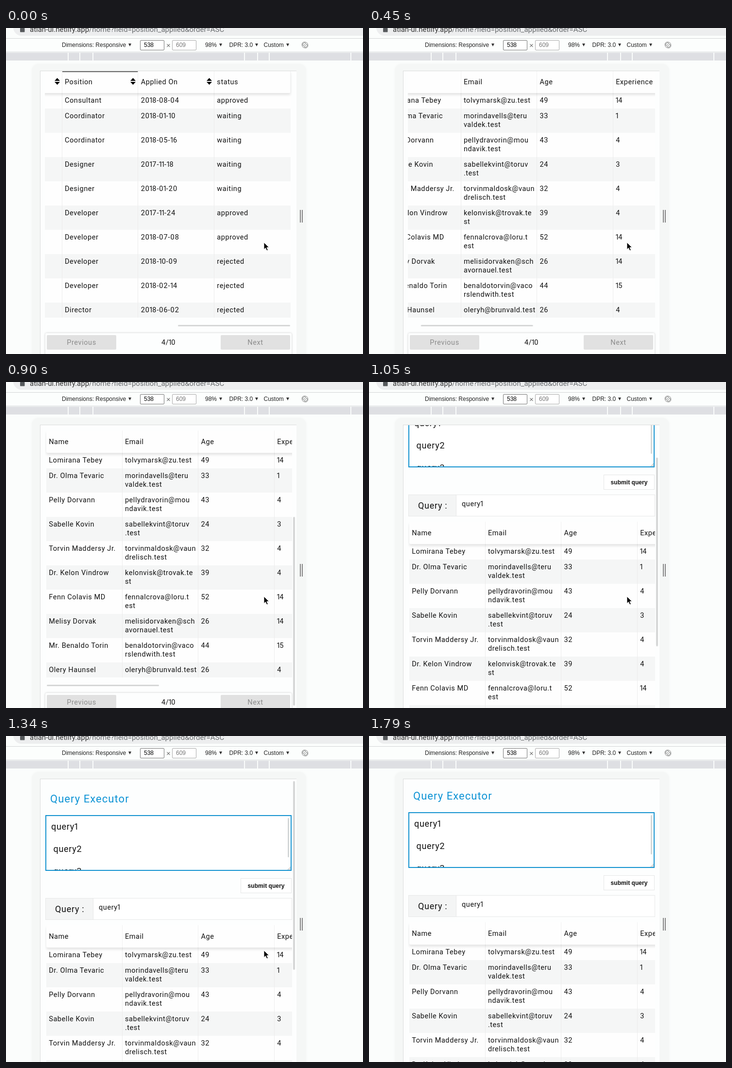
An HTML page for the animation above (2.69 s loop, 735 by 672 pixels).

```html
<!DOCTYPE html>
<html lang="en">
<head>
<meta charset="utf-8">
<title>Query table</title>
<style>
  html, body { margin: 0; width: 100%; height: 100%; overflow: hidden; }
  body { position: relative; background: #fbfdfc; color: #111; font: 14.5px/18px Roboto, sans-serif; letter-spacing: .58px; }
  body div, body svg { position: absolute; box-sizing: border-box; white-space: nowrap; }
  i { font-style: normal; margin: 0 -2.6px 0 -1.2px; }

  /* browser chrome */
  #address { left: 15px; top: -20px; width: 760px; height: 36px; border-radius: 17px; background: #edeeef; }
  #url { left: 49px; top: -6px; font-size: 15px; letter-spacing: 0; color: #333; }
  #url span { color: #696c6f; }
  #toolbar { left: 0; top: 21px; width: 735px; height: 29px; background: #fcfefd; border: solid #d3d5d7; border-width: 1px 0; }
  #ruler { left: 0; top: 51px; width: 735px; height: 16px; background: #dedfe3; }
  #ruler div { top: 0; width: 2px; height: 16px; background: #fbfdfc; }
  .tool { top: 26px; font: 12px/18px "Liberation Sans", Arial, sans-serif; letter-spacing: 0; color: #222; }
  .caret::after { content: ""; display: inline-block; margin: 0 0 1px 5px; border: solid transparent; border-width: 6px 3.5px 0; border-top-color: #333; }
  .size { top: 25px; width: 50px; height: 21px; padding-left: 7px; line-height: 19px; border: 1px solid #777; border-radius: 2px; background: #fff; }

  /* device */
  #device { left: 53px; top: 74px; width: 565px; height: 640px; border-radius: 14px; background: #f5f7f6; box-shadow: 0 0 5px #f5f7f6; }
  #card { left: 70px; top: 88px; width: 528px; height: 620px; background: #fdfefe; border: solid #dcdddd; border-width: 1px 0 0 1px; }
  .grip { top: 375px; width: 1.5px; height: 26px; background: #858585; }
  #view { inset: 0; clip-path: inset(89px 137px 0 71px); }
  #page { left: 0; top: 0; width: 735px; height: 672px; animation: scrollY 2690ms step-end infinite; }

  /* query form */
  #title { left: 91px; top: -185px; font-size: 22px; line-height: 26px; letter-spacing: 1.05px; color: #0d93d5; }
  #editor { left: 81px; top: -139px; width: 507px; height: 115px; border: 2px solid #1593d0; background: #fff; overflow: hidden; }
  #editor div, #label { font-size: 18px; letter-spacing: .7px; }
  #editor div { line-height: 46px; }
  #submit { left: 483px; top: -9px; width: 105px; height: 31px; border: 1px solid #e5e6e6; background: #fff; text-align: center; font: bold 12.1px/30px "Liberation Sans", Arial, sans-serif; letter-spacing: 0; }
  #query { left: 81px; top: 32px; width: 508px; height: 45px; border: 1px solid #e7e8e8; background: #fff; }
  #label { left: 0; top: 0; width: 98px; height: 43px; line-height: 44px; padding-left: 19px; background: #f4f5f5; border-right: 1px solid #e7e8e8; }

  /* table */
  #scroller { left: 80px; top: 88px; width: 509px; height: 509px; overflow: hidden; }
  #table { left: 3px; top: 0; width: 1097px; animation: scrollX 2690ms step-end infinite; }
  #table .row { position: relative; display: grid; grid-template-columns: repeat(7, 156.7px); background: #fefefe; }
  #table .row:nth-child(odd) { background: #f5f6f6; }
  #table .row div { position: relative; padding: 7px 0 7px 5.2px; border-right: 1px solid #ececec; }
  #table .row div:last-child { border-right-color: transparent; }
  #table .row:first-child { z-index: 1; height: 46px; background: #fefefe; border-radius: 3px; box-shadow: 0 4px 5px rgba(0,0,0,.1); }
  #table .row:first-child div { padding-top: 15px; border-right-color: #f1f1f1; }
  #table .row:first-child .sorted { border-top: 3px solid #6b6b6b; padding-top: 12px; }
  .date { letter-spacing: .98px; }
  .sort { right: 4px; top: 15px; width: 11px; height: 14px; }
  .sorted .sort { top: 12px; }

  .bar { border-radius: 2px; background: #d6d7d7; }
  #barX { left: 84px; top: 612px; width: 231px; height: 3px; animation: barX 2690ms step-end infinite; }
  #barY { left: 591px; top: 93px; width: 3.5px; height: 389px; animation: barY 2690ms step-end infinite; }
  #pager { left: 81px; top: 629px; width: 507px; height: 60px; border-radius: 3px; background: #fdfefe; box-shadow: 0 0 4px rgba(0,0,0,.2); text-align: center; line-height: 32px; }
  .button { top: 4px; width: 143px; height: 30px; border-radius: 2px; background: #e1e1e1; color: #8b8b8b; }
  #pointer { left: 530px; top: 441px; animation: pointer 2690ms step-end infinite; }

  @keyframes scrollX {
    0% { transform: translateX(-594px); }
    11.15% { transform: translateX(-470px); }
    16.72% { transform: translateX(-50px); }
    22.3%, 66.54% { transform: none; }
    100% { transform: none; }
  }
  @keyframes barX {
    0% { transform: translateX(270px); }
    11.15% { transform: translateX(213.6px); }
    16.72% { transform: translateX(22.7px); }
    22.3%, 100% { transform: none; }
  }
  @keyframes scrollY {
    0%, 22.3% { transform: none; }
    33.45% { transform: translateY(12px); }
    39.03% { transform: translateY(200px); }
    44.6% { transform: translateY(304px); }
    49.81% { transform: translateY(302px); }
    55.39% { transform: translateY(298px); }
    60.96% { transform: translateY(297px); }
    66.54%, 100% { transform: translateY(296px); }
  }
  @keyframes barY {
    0% { opacity: 0; }
    33.45% { opacity: 1; transform: translateY(185px); }
    39.03% { opacity: 1; transform: translateY(62.5px); }
    44.6% { opacity: 1; transform: none; }
    60.96%, 100% { opacity: 0; }
  }
  @keyframes pointer {
    0% { opacity: 1; transform: none; }
    55.39% { opacity: 1; transform: translate(84px, 211px); }
    60.96%, 100% { opacity: 0; }
  }
</style>
</head>
<body>
  <div id="address"></div>
  <svg style="left:28px;top:-5px" width="12" height="15"><path d="M3 7V3a3 3 0 0 1 6 0v4" fill="none" stroke="#55585b" stroke-width="1.6"/><rect x="1" y="5" width="9.5" height="8.5" rx="1" fill="#55585b"/></svg>
  <div id="url">atlan-ui.netlify.app<span>/home?field=position_applied&amp;order=ASC</span></div>
  <div id="toolbar"></div>
  <div class="tool caret" style="left:115px">Dimensions: Responsive</div>
  <div class="tool size" style="left:276px;color:#000">538</div>
  <div class="tool" style="left:330px;top:27px;font-size:15px;color:#666">×</div>
  <div class="tool size" style="left:342px;border-color:#aaa;color:#777">609</div>
  <div class="tool caret" style="left:410px">98%</div>
  <div class="tool caret" style="left:459.5px">DPR: 3.0</div>
  <div class="tool caret" style="left:530.5px">Custom</div>
  <svg style="left:607px;top:27px" width="17" height="17" fill="none" stroke="#777"><circle cx="8.5" cy="8" r="6"/><rect x="5.5" y="2" width="6" height="12" rx="1" fill="#fcfefd" transform="rotate(-45 8.5 8)"/><path d="M4 4l9 8.5"/></svg>
  <div id="ruler"></div>

  <div id="device"></div>
  <div id="card"></div>
  <div class="grip" style="left:605px"></div>
  <div class="grip" style="left:609px"></div>

  <div id="view">
    <div id="page">
      <div id="title">Query Executor</div>
      <div id="editor">
        <div style="left:10px;top:-1px">query<i>1</i></div>
        <div style="left:14.5px;top:45px">query2</div>
        <div style="left:14.5px;top:91px">query3</div>
        <div class="bar" style="left:496.5px;top:4px;width:3.5px;height:81px"></div>
        <svg style="right:0;bottom:0" width="6" height="6" stroke="#999"><path d="M0 6L6 0M3 6L6 3"/></svg>
      </div>
      <div id="submit">submit query</div>
      <div id="query">
        <div id="label">Query :</div>
        <div style="left:109px;top:10px">query<i>1</i></div>
      </div>
      <div id="scroller"><div id="table"></div></div>
      <div id="barX" class="bar"></div>
      <div id="pager">
        <div class="button" style="left:3px">Previous</div>
        <div style="left:203px;top:4px;width:101px">4/<i>1</i>0</div>
        <div class="button" style="left:361px">Next</div>
      </div>
    </div>
    <div id="barY" class="bar"></div>
  </div>

  <svg id="pointer" width="16" height="22"><path d="M1 1V15.5L4.4 12.4L6.8 18L9.4 16.9L7 11.4H11.6Z" fill="#000" stroke="#fff" stroke-width="1"/></svg>

<script>
  const headers = ['Name', 'Email', 'Age', 'Experience', 'Position', 'Applied On', 'status'];
  const records = `
Lomirana Tebey,tolvymarsk@zu.test,49,14,Consultant,2018-08-04,approved
Dr. Olma Tevaric,morindavells@teru|valdek.test,33,1,Coordinator,2018-01-10,waiting
Pelly Dorvann,pellydravorin@mou|ndavik.test,43,4,Coordinator,2018-05-16,waiting
Sabelle Kovin,sabellekvint@toruv|.test,24,3,Designer,2017-11-18,waiting
Torvin Maddersy Jr.,torvinmaldosk@vaun|drelisch.test,32,4,Designer,2018-01-20,waiting
Dr. Kelon Vindrow,kelonvisk@trovak.te|st,39,4,Developer,2017-11-24,approved
Fenn Colavis MD,fennalcrova@loru.t|est,52,14,Developer,2018-07-08,approved
Melisy Dorvak,melisidorvaken@sch|avornauel.test,26,14,Developer,2018-10-09,rejected
Mr. Benaldo Torin,benaldotorvin@vaco|rslendwith.test,44,15,Developer,2018-02-14,rejected
Olery Haunsel,oleryh@brunvald.test,26,4,Director,2018-06-02,rejected`
    .trim().split('\n').map(line => line.split(','));

  const sortIcon = '<svg class="sort"><path d="M0 6L5.5 0L11 6ZM0 8H11L5.5 14Z"/></svg>';
  const row = cells => `<div class="row">${cells.join('')}</div>`;
  const headCell = (text, i) =>
    `<div class="${i === 4 ? 'sorted' : ''}">${text}${i > 2 && i < 6 ? sortIcon : ''}</div>`;
  // The numeral one is set tighter than the other digits.
  const bodyCell = (text, i) =>
    `<div class="${i === 5 ? 'date' : ''}">${text.replace('|', '<br>').replace(/1/g, '<i>1</i>')}</div>`;

  document.getElementById('table').innerHTML =
    row(headers.map(headCell)) + records.map(record => row(record.map(bodyCell))).join('');
  document.getElementById('ruler').innerHTML =
    [127, 151, 178, 490, 517, 541, 709].map(x => `<div style="left:${x}px"></div>`).join('');
</script>
</body>
</html>
```
